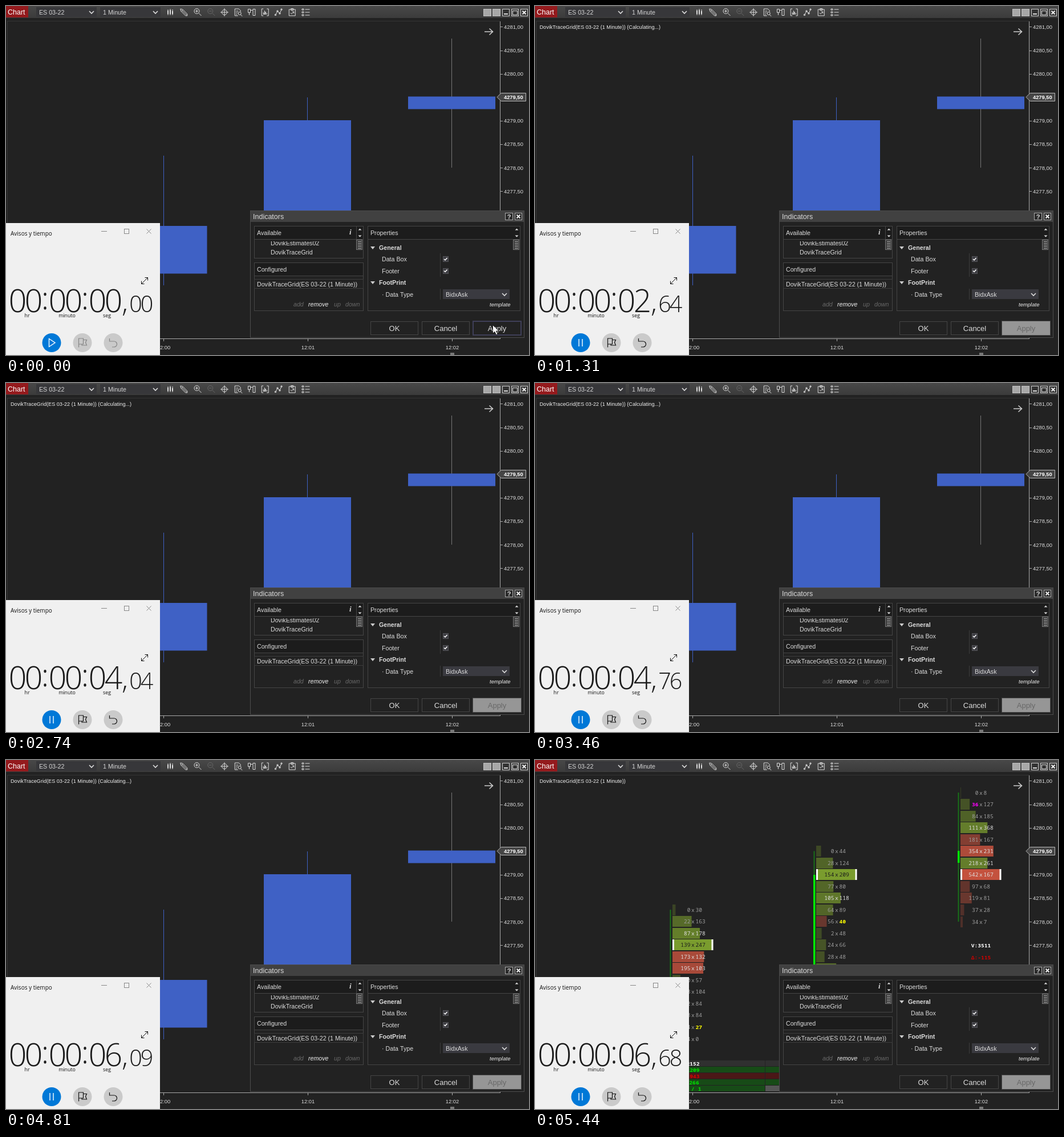
Recreate the animation shown at these times as an HTML page with a canvas. Size 917 by 611 pixels, loop 5530 ms.

```html
<!DOCTYPE html>
<html lang="es">
<head>
<meta charset="utf-8">
<title>Footprint chart</title>
<style>
html, body { margin: 0; width: 100%; height: 100%; overflow: hidden; background: #222; }
canvas { display: block; }
</style>
</head>
<body>
<canvas id="stage" width="917" height="611"></canvas>
<script>
const ctx = document.getElementById('stage').getContext('2d');
const SANS = '"Liberation Sans", Arial, sans-serif';
const MONO = '"Noto Sans Mono", "DejaVu Sans Mono", monospace';
const UI = '"Open Sans", "Noto Sans", sans-serif';
const INDICATOR = 'DovikTraceGrid';
const SERIES = INDICATOR + '(ES 03-22 (1 Minute))';

// Screen refresh times in hundredths of a second
const LOOP = 5530;
const refreshes = [0, 11, 21, 31, 40, 50, 60, 71, 80, 91, 101, 112, 122, 131, 141, 151, 162, 172,
  182, 191, 201, 211, 222, 232, 242, 253, 263, 274, 283, 294, 304, 315, 325, 335, 346, 357,
  368, 377, 388, 398, 408, 419, 429, 440, 450, 460, 471, 481, 492, 501, 512, 523, 533, 544];
// Stopwatch reading (hundredths) against time (ms)
const readings = [[110, 145], [800, 214], [1820, 313], [2740, 404], [3460, 476], [4810, 609], [5440, 668]];

function stopwatch(t) {
  if (t < 110) return 0;
  const i = Math.max(1, readings.findIndex(r => r[0] >= t));
  const [t0, v0] = readings[i - 1], [t1, v1] = readings[i];
  return Math.round(v0 + (v1 - v0) * (t - t0) / (t1 - t0));
}

function box(x, y, w, h, fill, stroke) {
  if (fill) { ctx.fillStyle = fill; ctx.fillRect(x, y, w, h); }
  if (stroke) {
    ctx.strokeStyle = stroke; ctx.lineWidth = 1;
    ctx.strokeRect(x + .5, y + .5, w - 1, h - 1);
  }
}
function text(s, x, y, { size = 10.67, color = '#dcdcdc', align = 'left', style = '', family = SANS } = {}) {
  ctx.font = `${style} ${size}px ${family}`;
  ctx.fillStyle = color; ctx.textAlign = align;
  ctx.fillText(s, x, y);
}
function path(d, x, y, { stroke, fill, width = 1 }) {
  const p = new Path2D(d);
  ctx.save();
  ctx.translate(x, y);
  if (fill) { ctx.fillStyle = fill; ctx.fill(p); }
  if (stroke) { ctx.strokeStyle = stroke; ctx.lineWidth = width; ctx.stroke(p); }
  ctx.restore();
}
const chevron = (x, y) => path('M-4 -2L0 2L4 -2', x, y, { stroke: '#ddd', width: 1.6 });
const cross = (x, y, r, stroke, width) =>
  path(`M${-r} ${-r}L${r} ${r}M${r} ${-r}L${-r} ${r}`, x, y, { stroke, width });

const icons = [
  'M-4.5 -3v6M-3.5 -3v6M-4 -5v10M-.5 -4v7M.5 -4v7M0 -6v11M3.5 -2v5M4.5 -2v5M4 -5v10',
  'M-6 -6l1 4L3 6L6 6L6 3L-2 -5ZM-4 -2L-2 -4M-3 -3L5 5',
  'M3.5 -2a4.5 4.5 0 1 1 -9 0a4.5 4.5 0 1 1 9 0M2.5 1.5L7 6M-3.5 -2h5M-1 -4.5v5',
  'M3.5 -2a4.5 4.5 0 1 1 -9 0a4.5 4.5 0 1 1 9 0M2.5 1.5L7 6M-3.5 -2h5',
  'M4.5 0a4.5 4.5 0 1 1 -9 0a4.5 4.5 0 1 1 9 0M-7 0h14M0 -7v14',
  'M0 6h-5.5v-12h7l3 3v2M-3.5 -2h4M-3.5 1h3M-3.5 4h2M5.5 2a2.5 2.5 0 1 1 -5 0a2.5 2.5 0 1 1 5 0M4.5 4l3 3',
  'M-6 -5.5h4v6h-4zM-2 -3.5h4M2.500 -5.500h4v11h-4zM-4 1v4',
  'M-3 -6h-3v12h3M3 -6h3v12h-3M-3 4v-4M-1 4v-7M1 4v-5M3 4v-3M-2 4v-2M0 4v-5',
  'M-5 4L-2 -2L2 2L5 -5M-6.500 3.500h2v2h-2zM-3 -3h2v2h-2zM1 1h2v2h-2zM4 -6h2v2h-2z',
  'M-5.500 -5h11v11h-11zM-2 -6.500h4v3h-4zM-3 1L-1 3L3 -1M0 -1h3v3',
  'M-6.500 -6h3v2h-3zM-6.500 -1h3v2h-3zM-6.500 4h3v2h-3zM-1 -5h8M-1 0h8M-1 5h8'
];

function toolbar() {
  const bar = ctx.createLinearGradient(0, 0, 0, 21);
  bar.addColorStop(0, '#484848');
  bar.addColorStop(1, '#3b3b3b');
  box(0, 0, 917, 21, bar);
  box(0, 0, 39, 20, '#941a1d');
  text('Chart', 3, 15, { size: 12.5, color: '#fff' });
  for (const [x, w, label] of [[53, 106, 'ES 03-22'], [165, 106, '1 Minute']]) {
    box(x, 2, w, 17, '#37373a');
    text(label, x + 5, 15, { color: '#d5d5d5' });
    chevron(x + w - 9, 11);
  }
  icons.forEach((d, i) => path(d, 288 + i * 23.75, 11, { stroke: i === 3 ? '#666' : '#ddd' }));
  box(837, 5, 14, 13, '#a8a8a8', '#c0c0c0');
  box(853, 5, 14, 13, '#a8a8a8', '#c0c0c0');
  for (const x of [870, 886, 902]) box(x, 5, 13, 13, '#333', '#ccc');
  box(873, 13, 7, 2, '#ddd');
  box(888, 8, 9, 8, null, '#ddd');
  cross(908.5, 11.500, 3, '#eee', 2);
}

function axes() {
  box(2, 26, 865, 557, null, '#353535');
  box(866, 27, 1, 556, '#a8a8a8');
  box(270, 582, 597, 1, '#a8a8a8');
  for (let i = 0; i < 8; i++) {
    const y = 36.4 + i * 41.1;
    box(867, Math.round(y), 4, 1, '#aaa');
    if (i !== 3) text((4281 - i / 2).toFixed(2).replace('.', ','), 873, y + 3.500, { size: 9.4 });
  }
  path('M861 159.500L868 152.500H911.500V166.500H868Z', 0, 0, { fill: '#454545', stroke: '#bbb' });
  text('4279,50', 873, 163, { size: 9.3, style: 'bold', color: '#fff' });
  ['12:00', '12:01', '12:02'].forEach((label, i) => {
    const x = 276 + i * 253;
    box(x, 583, 1, 4, '#aaa');
    text(label, x + .5, 601, { size: 9.4, align: 'center' });
  });
  box(779, 607, 7, 4, '#777');
  path('M839 45H853M847.500 39.500L853.500 45L847.500 50.500', 0, 0, { stroke: '#ccc', width: 1.6 });
}

function candles() {
  const blue = '#3f61c5';
  box(276, 262, 1, 227, blue);
  box(200, 385, 152.500, 83.500, blue);
  box(528, 160, 1, 41, blue);
  box(452, 200, 153, 200, blue);
  box(781, 57, 1, 226, '#777');
  box(705, 158.500, 153, 22, blue);
}

// Rows are [bid, ask, highlighted side, highlight colour]
const footprints = [
  { x: 241, y: 262, body: [385, 468], rows: [[0, 30], [22, 163], [87, 178], [139, 247], [173, 132], [195, 103],
    [20, 57], [48, 104], [42, 84], [38, 84], [14, 27, 1, '#ffff00'], [4, 0]] },
  { x: 493, y: 159.500, body: [201, 400], rows: [[0, 44], [28, 124], [154, 209], [77, 80], [105, 118], [64, 89],
    [56, 40, 1, '#ffff00'], [2, 48], [24, 66], [28, 48], [72, 110]] },
  { x: 746, y: 57, body: [159, 180], rows: [[0, 8], [36, 127, 0, '#ff00ff'], [84, 185], [111, 368], [181, 167],
    [354, 231], [218, 261], [542, 167], [97, 68], [119, 81], [37, 28], [34, 7]] }
];

function footprint({ x, y, body, rows }) {
  const peak = Math.max(...rows.map(r => r[0] + r[1]));
  const bottom = y + (rows.length - 1) * 20.55;
  box(x - 4.500, y, 2, bottom - y, '#187018');
  box(x - 5, body[0], 3.500, body[1] - body[0], '#00f000');
  rows.forEach(([bid, ask, side, glow], i) => {
    const cy = y + i * 20.55, top = Math.round(cy - 9.500);
    const ratio = (bid + ask) / peak, buy = ask > bid, full = ratio === 1;
    const alpha = .22 + .78 * ratio;
    box(x, top, Math.max(1, ratio * 70), 19, `rgba(${buy ? '122,156,46' : '196,82,62'},${alpha})`);
    if (full) {
      box(x, top, 3, 19, '#fff');
      box(x + 68.500, top, 3, 19, '#fff');
    }
    const color = full && buy ? '#1c1c1c' : ratio > .6 ? '#dedede' : '#9c9c9c';
    const cell = (s, dx, align, lit) => text(s, x + 36 + dx, cy + 3.500,
      { size: 9.600, family: MONO, align, color: lit ? glow : color, style: lit ? 'bold' : '' });
    cell(bid, -4.500, 'right', side === 0);
    cell('x', 0, 'center');
    cell(ask, 4.500, 'left', side === 1);
  });
}

function orderFlow() {
  footprints.forEach(footprint);
  const bold = { size: 9.600, family: MONO, align: 'center', style: 'bold' };
  text('V:3511', 782, 328, { ...bold, color: '#fff' });
  text('Δ:-115', 782, 349, { ...bold, color: '#d00000' });
  const green = '#174b17', lime = '#00e000';
  [['2152', '#303030', '#fff'], ['1209', green, lime], ['-943', '#4b1717', '#e00000'],
    ['266', green, lime], ['0 / 1', green, lime]].forEach(([label, fill, color], i) => {
    const y = 526 + i * 11;
    box(150, y, 278, 10, fill);
    if (i === 4) box(403, y, 25, 10, '#555');
    text(label, label.length < 4 ? 279 : 277, y + 9, { ...bold, color });
  });
  box(403, 526, 1, 54, '#222');
}

function spinner(x) {
  path('M-3 -4.500L0 -7.500L3 -4.500ZM-3 4.500L0 7.500L3 4.500Z', x, 397, { fill: '#ddd' });
}
function thumb(x, y) {
  box(x, y, 11, 18, '#3a3a3a', '#777');
  for (let i = 3; i < 16; i += 3) box(x + 3, y + i, 6, 1, '#aaa');
}

function dialog(applied) {
  const edge = '#454545';
  box(428, 358, 481, 223, '#222', '#4c4c4c');
  box(429, 359, 479, 19, '#414141');
  text('Indicators', 433, 373, { size: 12.5 });
  box(875, 362, 14, 13, '#2a2a2a', '#aaa');
  text('?', 882, 373, { size: 11, style: 'bold', align: 'center' });
  box(892, 362, 13, 13, '#2a2a2a', '#aaa');
  cross(898.500, 368.500, 3, '#eee', 2);

  box(435, 408, 192, 34, null, edge);
  box(435, 385, 192, 24, '#1c1c1c', edge);
  text('Available', 440, 401);
  text('i', 602, 400, { size: 13, style: 'italic bold', family: '"Liberation Serif", serif' });
  box(614, 386, 1, 22, edge);
  spinner(620.500);
  ctx.save();
  ctx.beginPath(); ctx.rect(436, 412, 177, 29); ctx.clip();
  text('DovikEstimates02', 464, 419);
  ctx.restore();
  text(INDICATOR, 464, 435);
  thumb(614, 409);

  box(435, 472, 192, 62, null, edge);
  box(435, 449, 192, 24, '#1c1c1c', edge);
  text('Configured', 440, 465);
  box(435, 478, 192, 17, null, '#3c3c3c');
  text(SERIES, 440, 490.500);
  [['add', 504], ['remove', 530], ['up', 575], ['down', 595]].forEach(([label, x]) =>
    text(label, x, 526, { style: 'italic', color: label === 'remove' ? '#eee' : '#686868' }));

  box(634, 408, 268, 126, null, edge);
  box(634, 385, 268, 24, '#1c1c1c', edge);
  text('Properties', 639, 401);
  spinner(895.500);
  thumb(889, 409);
  for (const [label, y] of [['General', 423], ['FootPrint', 484]]) {
    path('M-4 -2H4L0 3Z', 643, y, { fill: '#ccc' });
    text(label, 654, y + 4, { style: 'bold' });
  }
  box(761, 433, 1, 41, '#3c3c3c');
  box(761, 495, 1, 19, '#3c3c3c');
  for (const [label, y] of [['Data Box', 443], ['Footer', 463.500]]) {
    text(label, 659, y + 4);
    box(766, Math.round(y) - 5, 10, 10, '#3d3d42', '#55555a');
    path('M-2.500 0L-.5 2L3 -2', 770.500, y, { stroke: '#fff', width: 1.500 });
  }
  text('· Data Type', 659, 509);
  box(766, 496, 117, 17, '#3a3a40');
  text('BidxAsk', 771, 509);
  chevron(874, 505);
  text('template', 848, 526, { size: 9.5, style: 'italic', color: '#eee' });

  const label = (s, x, color) => text(s, x, 568.500, { size: 13, align: 'center', color });
  box(639, 552, 84, 24, null, edge);
  label('OK', 681);
  box(729, 552, 84, 24, null, edge);
  label('Cancel', 771);
  if (applied) {
    box(818, 551, 86, 26, '#969696', '#4a4a4a');
    label('Apply', 861, '#686868');
  } else {
    box(818, 551, 86, 26, null, '#3f3f58');
    box(819, 552, 84, 24, null, '#3f3f58');
    label('Apply', 861);
    path('M0 0V14.500L3.300 11.500L6 17L8.500 16L6 10.500H10.500Z', 853.500, 558.500, { fill: '#fff', stroke: '#111', width: .8 });
  }
}

function clock(value, running) {
  box(0, 380, 270, 231, '#f0f0f0');
  text('Avisos y tiempo', 8, 401.500, { size: 10, family: UI, color: '#111' });
  box(167, 394, 10, 1, '#888');
  box(207, 390, 9, 9, null, '#888');
  cross(250.500, 394.500, 4, '#888', 1);
  path('M237.500 486.500L248.500 475.500M243.500 475.500H248.500V480.500M237.500 481.500V486.500H242.500', 0, 0, { stroke: '#111' });

  const seconds = String(Math.floor(value / 100)).padStart(2, '0');
  const digits = { size: 55, style: '300', family: UI, color: '#1c1c1c', align: 'center' };
  ['00', '00', seconds].forEach((pair, i) => {
    text(pair[0], 20.500 + i * 70, 535.500, digits);
    text(pair[1], 48.500 + i * 70, 535.500, digits);
    if (i < 2) text(':', 68.500 + i * 70, 531, digits);
    text(['hr', 'minuto', 'seg'][i], 37 + i * 70, 545, { size: 8.800, family: UI, color: '#111', align: 'center' });
  });
  const small = { ...digits, size: 39.500 };
  text(',', 208.500, 535.500, { ...small, size: 50 });
  const cents = String(value % 100).padStart(2, '0');
  text(cents[0], 227.500, 535.500, small);
  text(cents[1], 247, 535.500, small);

  [[80, '#0078d7'], [134, '#cacaca'], [188, '#cacaca']].forEach(([x, fill]) =>
    path('M16.500 0A16.500 16.500 0 1 1 -16.500 0A16.500 16.500 0 1 1 16.500 0', x, 589.500, { fill }));
  path(running ? 'M-3 -6.500V6.500M3 -6.500V6.500' : 'M-4.500 -7L6 0L-4.500 7Z', 80, 589.500, { stroke: '#fff', width: 1.400 });
  const ink = { stroke: running ? '#111' : '#858585', width: 1.200 };
  path('M-6.500 8V-7.500H1.500V2.500H-6.500M1.500 -5H7.500L5.500 -.5L7.500 4.500H-1V2.500', 134, 589.500, ink);
  path('M-6.500 -7.500V-2.500H-1.500M-6.500 -2.500H1.500A5 5 0 0 1 1.500 7.500H-2', 188, 589.500, ink);
}

function draw(now) {
  const elapsed = now % LOOP;
  const t = 10 * refreshes.filter(r => r * 10 <= elapsed).pop();
  const applied = t >= 110, ready = t >= 4920;
  box(0, 0, 917, 611, '#222');
  toolbar();
  axes();
  if (ready) orderFlow(); else candles();
  if (applied) text(SERIES + (ready ? '' : ' (Calculating...)'), 8, 40, { size: 9.150, color: '#eee' });
  dialog(applied);
  clock(stopwatch(t), applied);
}

let begin;
function tick(now) {
  begin ??= now;
  draw(now - begin);
  requestAnimationFrame(tick);
}
requestAnimationFrame(tick);
</script>
</body>
</html>
```
